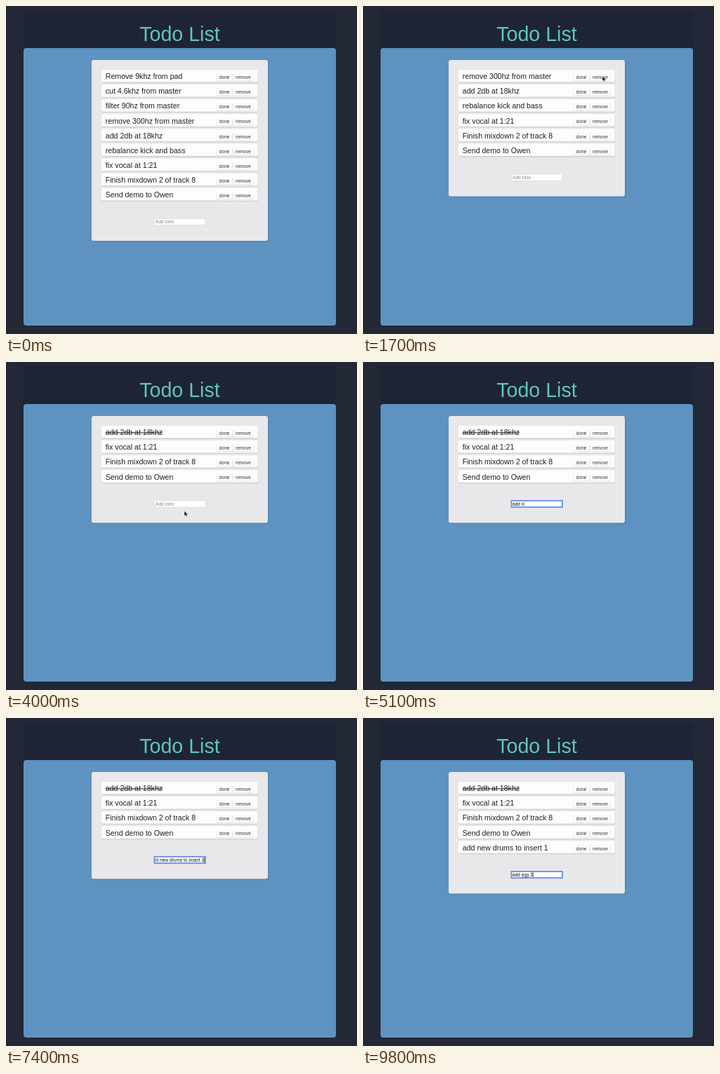
Recreate the animation shown at these times as an HTML page. Size 500x468 px, loop 10 s.

```html
<!DOCTYPE html>
<html lang="en">
<head>
<meta charset="utf-8">
<title>Todo List</title>
<style>
  html, body { margin: 0; width: 100%; height: 100%; overflow: hidden; background: #222835; }
  svg { display: block; width: 500px; height: 468px; }
  text { font-family: "Liberation Sans", Arial, sans-serif; white-space: pre; }
  .item { font-size: 10.6px; fill: #1d1f22; }
  .small { font-size: 6.6px; fill: #333; }
  .label { text-anchor: middle; }
</style>
</head>
<body>
<svg id="stage" viewBox="0 0 500 468">
  <defs>
    <clipPath id="inner"><rect x="212.6" y="0" width="70.6" height="10"/></clipPath>
  </defs>
  <rect width="500" height="468" fill="#222835"/>
  <rect x="25" y="6" width="445" height="60" fill="#1e2434"/>
  <text x="247.5" y="50.3" font-size="28.6" fill="#5fc6bc" text-anchor="middle">Todo List</text>
  <rect x="25" y="60" width="445" height="396" rx="4" fill="#5e93c1"/>
  <rect id="shade" x="124" y="79" width="251" rx="3" fill="#568ab2"/>
  <rect id="card" x="122" y="77" width="251" rx="3" fill="#e8e8ea"/>
  <g id="rows"></g>
  <g id="field">
    <rect id="box" x="211.5" y="0.3" width="72.4" height="9.2" fill="#fff"/>
    <g clip-path="url(#inner)">
      <text id="hint" class="small" x="213" y="7.2" style="fill:#8b8b8e">Add todo</text>
      <text id="entry" class="small" y="7.2" style="fill:#111"></text>
      <path id="spell" d="M225.8 8.5h10.6" stroke="#555" stroke-width=".7"/>
      <path id="caret" d="M0 1.4v7" stroke="#111" stroke-width=".8"/>
    </g>
  </g>
  <path id="pointer" d="M0 0v7.2l1.7-1.5 1.2 2.6 1.2-.6-1.1-2.4h2.3z" fill="#111" stroke="#fff" stroke-width=".5"/>
  <path id="beam" d="M-1.3-3.8q1.3 0 1.3 1 0-1 1.3-1M0-3v6M-1.3 3.8q1.3 0 1.3-1 0 1 1.3 1" fill="none" stroke="#222" stroke-width=".7"/>
</svg>
<script>
const LOOP = 10000, TICK = 100, PITCH = 21.1;
const FOCUS = 4300, ENTER = 7800;
const $ = id => document.getElementById(id);

function make(parent, tag, attrs, content) {
  const el = document.createElementNS("http://www.w3.org/2000/svg", tag);
  for (const key in attrs) el.setAttribute(key, attrs[key]);
  if (content) el.textContent = content;
  return parent.appendChild(el);
}
function set(el, attrs) {
  for (const key in attrs) el.setAttribute(key, attrs[key]);
}
function show(el, on) {
  el.style.display = on ? "" : "none";
}

const todos = [
  { text: "Remove 9khz from pad", gone: 1000 },
  { text: "cut 4.6khz from master", gone: 1400 },
  { text: "filter 90hz from master", gone: 1700 },
  { text: "remove 300hz from master", done: 2200, gone: 3200 },
  { text: "add 2db at 18khz", done: 2600 },
  { text: "rebalance kick and bass", gone: 3500 },
  { text: "fix vocal at 1:21" },
  { text: "Finish mixdown 2 of track 8" },
  { text: "Send demo to Owen" },
  { text: "add new drums to insert 1", from: ENTER }
];

function button(parent, x, width, label) {
  make(parent, "rect", { x, y: 97.4, width, height: 9.8, rx: 1.2, fill: "#d9d9db" });
  make(parent, "rect", { x: x + .4, y: 97.2, width: width - .8, height: 9.3, rx: 1, fill: "#fdfdfd" });
  make(parent, "text", { x: x + width / 2, y: 104.2, class: "small label" }, label);
}

for (const todo of todos) {
  const g = todo.row = make($("rows"), "g", {});
  make(g, "rect", { x: 136, y: 92, width: 223, height: 17.9, rx: 2, fill: "#cdcdd1" });
  make(g, "rect", { x: 136, y: 91, width: 222.6, height: 17.6, rx: 2, fill: "#fdfdfd" });
  todo.title = make(g, "text", { x: 141.8, y: 104.3, class: "item" }, todo.text);
  button(g, 299.6, 23.2, "done");
  button(g, 323.2, 29.6, "remove");
}

// Each pair is a run of key presses: start time and count, one per tick.
const beats = runs => runs.flatMap(([start, n]) => Array.from({ length: n }, (_, i) => start + i * TICK));
const entries = [
  { text: todos[9].text, keys: beats([[4700, 8], [5700, 3], [6100, 7], [6900, 1], [7100, 2], [7400, 1]]) },
  { text: "add eqs 2", keys: beats([[8300, 1], [8500, 2], [8800, 3], [9200, 2], [9800, 1]]) }
];
function typed(t) {
  const { text, keys } = entries[t < ENTER ? 0 : 1];
  const pressed = keys.filter(k => k <= t).length;
  return text.slice(0, Math.floor(pressed * text.length / keys.length));
}

// Pointer stops: time, x, y
const path = [
  [200, 420, 466], [900, 341, 100], [1700, 341, 100], [2200, 313, 102],
  [2300, 313, 102], [2600, 313, 123], [2900, 330, 103], [3100, 339, 102],
  [3200, 339, 102], [3400, 339, 123], [3500, 339, 123], [4000, 254, 212.5], [4300, 258, 203]
];
function pointerAt(t) {
  const i = path.findIndex(p => p[0] > t);
  if (i < 0) return path[path.length - 1].slice(1);
  const [t0, x0, y0] = path[Math.max(0, i - 1)], [t1, x1, y1] = path[i];
  const u = Math.max(0, (t - t0) / (t1 - t0 || 1));
  const e = u * u * (3 - 2 * u);
  return [x0 + (x1 - x0) * e, y0 + (y1 - y0) * e];
}

function draw(t) {
  let count = 0;
  for (const { row, title, from = 0, done = Infinity, gone = Infinity } of todos) {
    const on = t >= from && t < gone;
    show(row, on);
    if (!on) continue;
    set(row, { transform: `translate(0 ${PITCH * count++})` });
    title.style.textDecoration = t >= done ? "line-through" : "none";
  }
  const height = 68 + PITCH * count;
  set($("card"), { height });
  set($("shade"), { height });
  set($("field"), { transform: `translate(0 ${113.2 + PITCH * count})` });

  const focused = t >= FOCUS, text = typed(t), entry = $("entry");
  set($("box"), { stroke: focused ? "#6a94e4" : "#d6d6da", "stroke-width": focused ? 1.9 : .6 });
  show($("hint"), !text);
  entry.textContent = text;
  const width = text ? entry.getComputedTextLength() : 0;
  const x = 213 - Math.max(0, width - 69);
  set(entry, { x });
  show($("spell"), t >= 9300);
  show($("caret"), focused);
  set($("caret"), { transform: `translate(${x + width + .2} 0)`, opacity: t < 6300 ? .35 : 1 });

  const [px, py] = pointerAt(t);
  for (const id of ["pointer", "beam"]) set($(id), { transform: `translate(${px} ${py})` });
  show($("pointer"), t >= 200 && t < FOCUS);
  show($("beam"), focused && t < 4700);
}

let last = -1;
const start = performance.now();
function frame() {
  const t = Math.floor(((performance.now() - start) % LOOP) / TICK) * TICK;
  if (t !== last) draw(last = t);
  requestAnimationFrame(frame);
}
frame();
</script>
</body>
</html>
```
